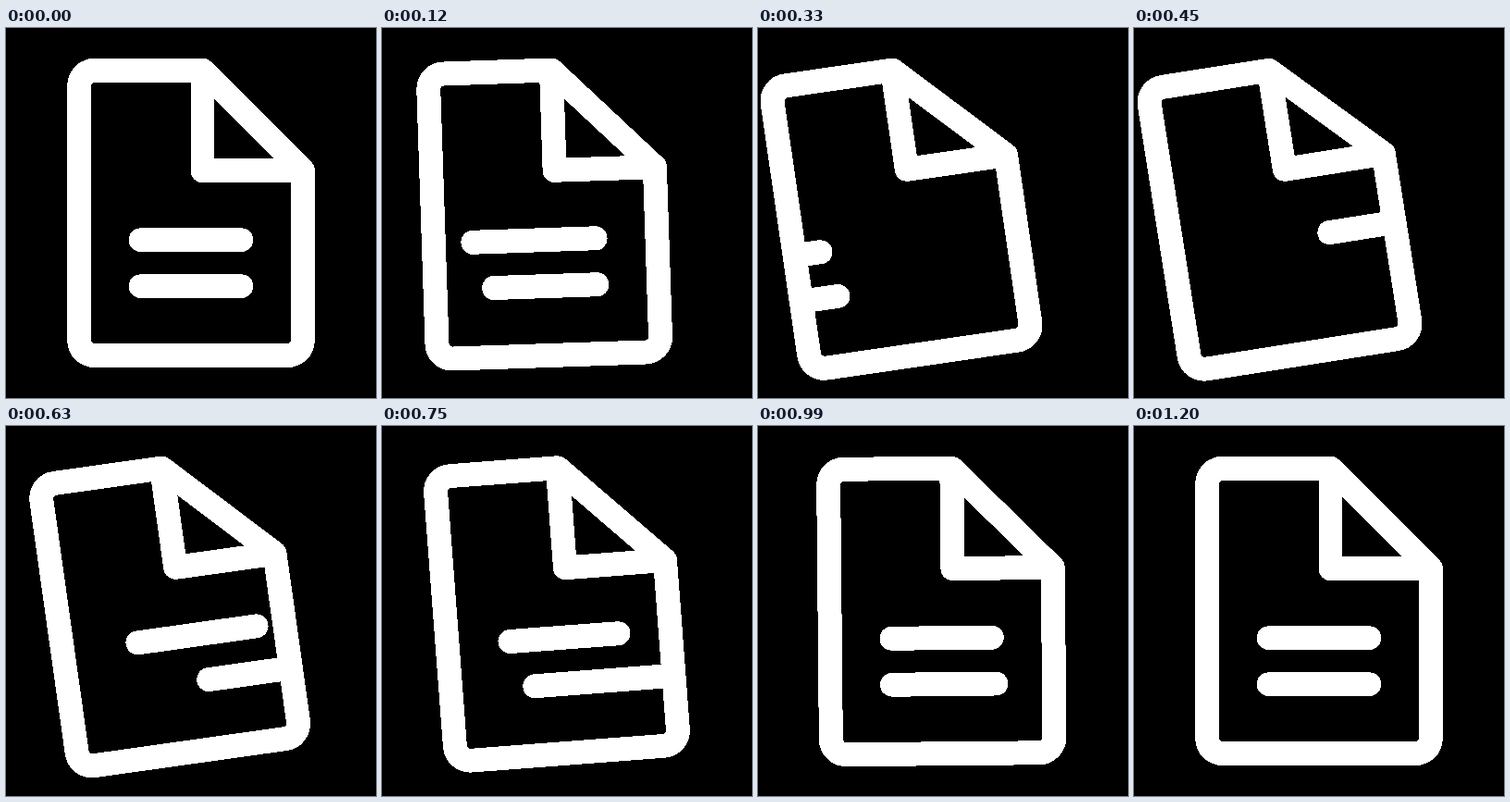
Write an HTML page that moves like this. It is 400x400 px and loops after 1.73 s.

```html
<!DOCTYPE html>
<html lang="en">
<head>
<meta charset="utf-8">
<title>Document icon</title>
<style>
  html, body { margin: 0; width: 100%; height: 100%; overflow: hidden; background: #000; }
  svg { display: block; width: 100%; height: 100%; }
</style>
</head>
<body>
<svg viewBox="0 0 400 400">
  <!-- hard edges: every touched pixel becomes solid -->
  <filter id="solid" filterUnits="userSpaceOnUse" x="0" y="0" width="400" height="400" color-interpolation-filters="sRGB">
    <feComponentTransfer><feFuncA type="linear" slope="40"/></feComponentTransfer>
  </filter>
  <clipPath id="inside"><rect x="79.17" y="45.83" width="241.66" height="308.34"/></clipPath>
  <g filter="url(#solid)">
    <g id="doc" fill="none" stroke="#fff" stroke-width="25" stroke-linecap="round" stroke-linejoin="round">
      <path d="M212.5 45.83H95.83A16.67 16.67 0 0 0 79.17 62.5V337.5A16.67 16.67 0 0 0 95.83 354.17H304.17A16.67 16.67 0 0 0 320.83 337.5V154.17Z"/>
      <path d="M212.5 45.83V154.17H320.83"/>
      <g id="lines" clip-path="url(#inside)"></g>
    </g>
  </g>
</svg>
<script>
const LOOP = 1730, STEP = 30, END = 1200;
const LEFT = 145.83, RIGHT = 254.17;   // resting ends of the text lines
const OFF_LEFT = 66.67, OFF_RIGHT = 333.33;

const doc = document.getElementById('doc');
const lines = document.getElementById('lines');

// cubic-bezier(.4, 0, .2, 1)
function ease(x) {
  if (x <= 0) return 0;
  if (x >= 1) return 1;
  let lo = 0, hi = 1;
  for (let i = 0; i < 24; i++) {
    const s = (lo + hi) / 2, r = 1 - s;
    if (1.2 * r * r * s + 0.6 * r * s * s + s * s * s < x) lo = s; else hi = s;
  }
  return lo * lo * (3 - 2 * lo);
}

const tween = (t, start, span, a, b) => a + (b - a) * ease((t - start) / span);

// out to the peak value, then back to zero at END
const swing = (t, turn, peak) =>
  t < turn ? tween(t, 0, turn, 0, peak) : tween(t, turn, END - turn, peak, 0);

// each row slides out on the left, then a new one comes in from the right
const rows = [
  { y: 229.17, out: [0, 111], in: [274, 433] },
  { y: 279.17, out: [68, 131], in: [433, 605] }
];

function addLine(y) {
  const el = document.createElementNS('http://www.w3.org/2000/svg', 'line');
  el.setAttribute('y1', y);
  el.setAttribute('y2', y);
  lines.append(el);
  return el;
}

for (const row of rows) {
  row.leaving = addLine(row.y);
  row.entering = addLine(row.y);
}

function place(el, x1, x2) {
  el.setAttribute('x1', x1);
  el.setAttribute('x2', x2);
}

function draw(time) {
  const t = Math.min(END, Math.floor((time % LOOP) / STEP) * STEP);
  doc.setAttribute('transform',
    `translate(${swing(t, 327, -45)} 0) rotate(${swing(t, 500, -9)} 200 200)`);

  for (const row of rows) {
    place(row.leaving,
      tween(t, row.out[0], 433, LEFT, OFF_LEFT),
      tween(t, row.out[1], 433, RIGHT, OFF_LEFT));
    place(row.entering,
      tween(t, row.in[0], 535, OFF_RIGHT, LEFT),
      tween(t, row.in[1], 535, OFF_RIGHT, RIGHT));
  }
}

const begin = performance.now();
function tick() {
  draw(performance.now() - begin);
  requestAnimationFrame(tick);
}
tick();
</script>
</body>
</html>
```
